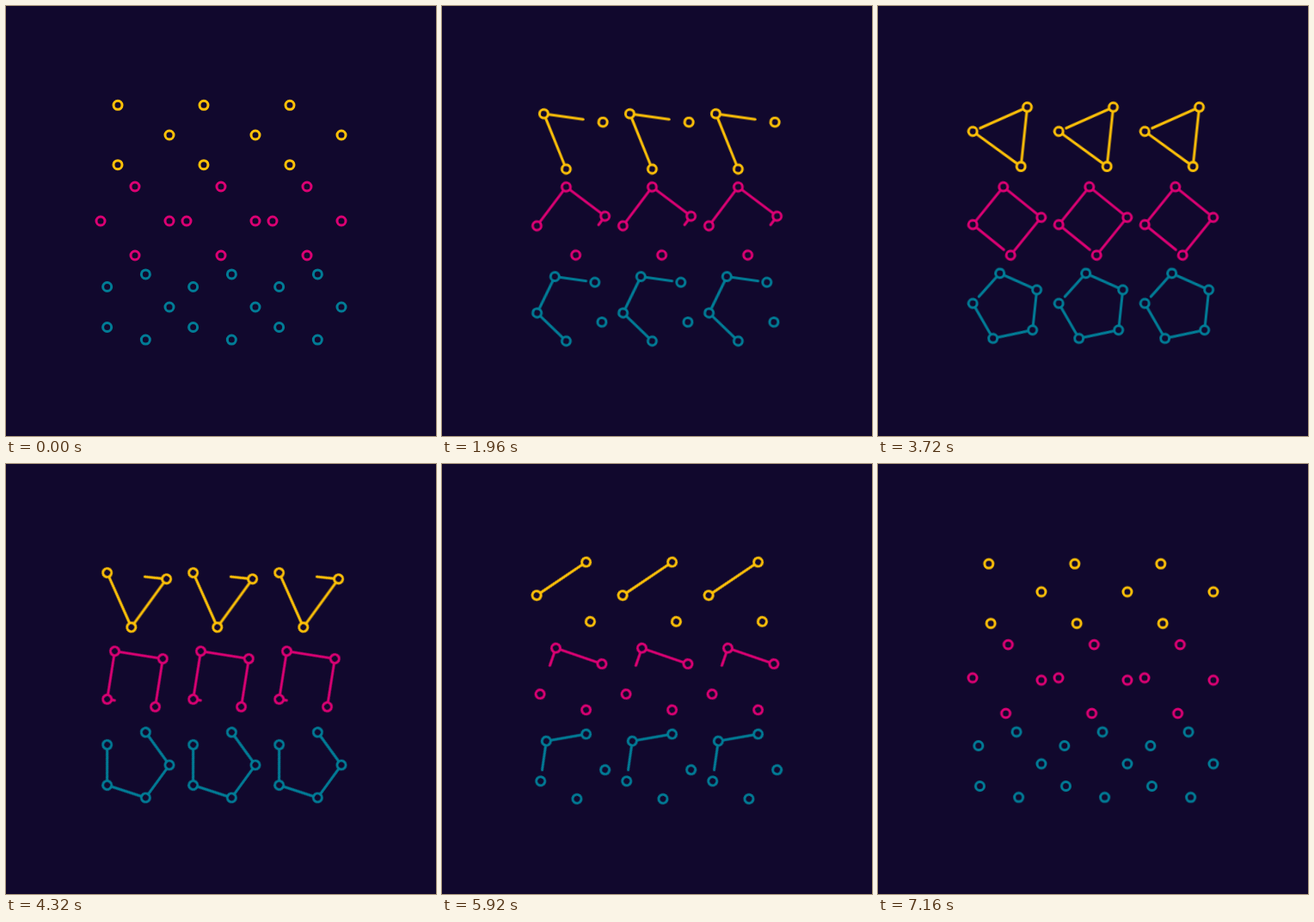
Recreate the animation shown at these times as an HTML page without scripts. Size 500 by 500 pixels, loop 7200 ms.

```html
<!DOCTYPE html>
<html lang="en">
<head>
<meta charset="utf-8">
<title>Turning polygons</title>
<style>
  html, body { margin: 0; height: 100%; overflow: hidden; background: #11082d; }
  svg { display: block; width: 100vw; height: 100vh; }
  circle { fill: #11082d; stroke-width: 3; }

  path {
    fill: none;
    stroke-width: 3;
    stroke-linecap: round;
    stroke-linejoin: round;
    stroke-dasharray: 1 2;
    animation: spin 7.2s linear infinite, trace 7.2s linear -40ms infinite;
  }
  .tri { stroke: #ffc107; marker-start: url(#dot-tri); marker-mid: url(#dot-tri); }
  .sq  { stroke: #dc0073; marker-start: url(#dot-sq); marker-mid: url(#dot-sq); animation-direction: reverse, normal; }
  .pent { stroke: #007c96; marker-start: url(#dot-pent); marker-mid: url(#dot-pent); }

  @keyframes spin {
    from { transform: rotate(0deg); }
    to { transform: rotate(360deg); }
  }
  /* draws the outline, then wipes it from its start */
  @keyframes trace {
    from { stroke-dashoffset: 1; }
    to { stroke-dashoffset: -1; }
  }
</style>
</head>
<body>
<svg viewBox="0 0 500 500">
  <defs>
    <marker id="dot-tri" markerUnits="userSpaceOnUse" markerWidth="16" markerHeight="16" refX="8" refY="8">
      <circle cx="8" cy="8" r="5" stroke="#ffc107"/>
    </marker>
    <marker id="dot-sq" markerUnits="userSpaceOnUse" markerWidth="16" markerHeight="16" refX="8" refY="8">
      <circle cx="8" cy="8" r="5" stroke="#dc0073"/>
    </marker>
    <marker id="dot-pent" markerUnits="userSpaceOnUse" markerWidth="16" markerHeight="16" refX="8" refY="8">
      <circle cx="8" cy="8" r="5" stroke="#007c96"/>
    </marker>
  </defs>

  <g transform="translate(150 150)"><path class="tri" pathLength="1" d="M40 0L-20 34.64L-20-34.64L40 0"/></g>
  <g transform="translate(250 150)"><path class="tri" pathLength="1" d="M40 0L-20 34.64L-20-34.64L40 0"/></g>
  <g transform="translate(350 150)"><path class="tri" pathLength="1" d="M40 0L-20 34.64L-20-34.64L40 0"/></g>

  <g transform="translate(150 250)"><path class="sq" pathLength="1" d="M0-40L40 0L0 40L-40 0L0-40"/></g>
  <g transform="translate(250 250)"><path class="sq" pathLength="1" d="M0-40L40 0L0 40L-40 0L0-40"/></g>
  <g transform="translate(350 250)"><path class="sq" pathLength="1" d="M0-40L40 0L0 40L-40 0L0-40"/></g>

  <g transform="translate(150 350)"><path class="pent" pathLength="1" d="M40 0L12.36 38.04L-32.36 23.51L-32.36-23.51L12.36-38.04L40 0"/></g>
  <g transform="translate(250 350)"><path class="pent" pathLength="1" d="M40 0L12.36 38.04L-32.36 23.51L-32.36-23.51L12.36-38.04L40 0"/></g>
  <g transform="translate(350 350)"><path class="pent" pathLength="1" d="M40 0L12.36 38.04L-32.36 23.51L-32.36-23.51L12.36-38.04L40 0"/></g>
</svg>
</body>
</html>
```
